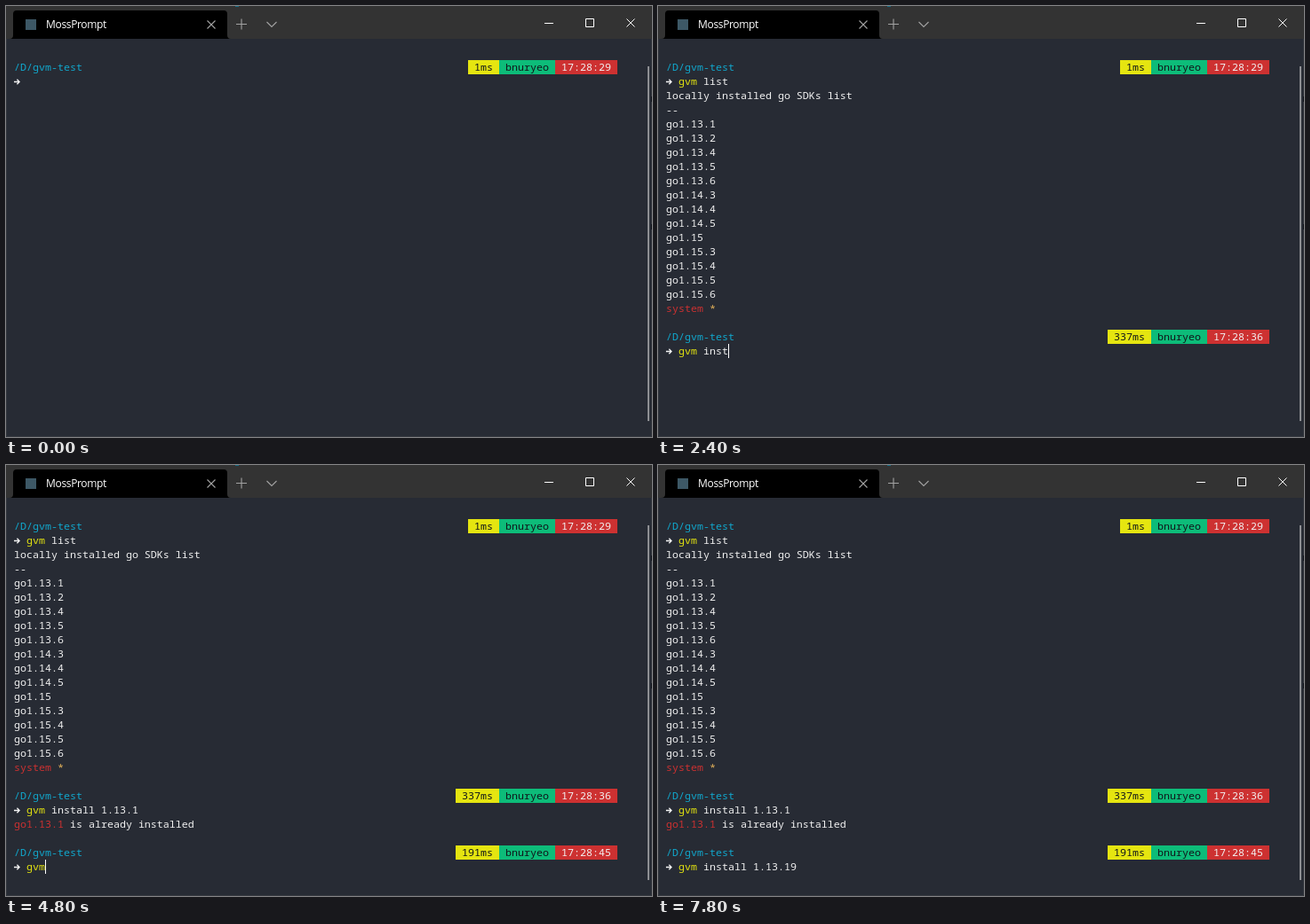
An HTML page that plays this animation: 727 by 486 pixels, repeating every 8 s.

```html
<!DOCTYPE html>
<html lang="en">
<head>
<meta charset="utf-8">
<title>Terminal</title>
<style>
  html, body { margin: 0; width: 100%; height: 100%; overflow: hidden; background: #272b34; }
  #stage { position: relative; width: 727px; height: 486px; overflow: hidden; background: #272b34; }
  #chrome { position: absolute; inset: 0; }
  #title {
    position: absolute; left: 45px; top: 13px; color: #fff;
    font: 12px/16px "Open Sans", "Noto Sans", sans-serif; letter-spacing: -.35px;
  }
  .row, .badges {
    position: absolute; height: 16px; white-space: pre; color: #f2f2f2;
    font: 500 11.667px/16px "Noto Sans Mono", "DejaVu Sans Mono", monospace;
    font-variant-ligatures: none;
  }
  .row { left: 9px; }
  .row svg { vertical-align: top; }
  .badges { right: 39px; display: flex; color: #10151a; }
  .badges .time { color: #f2f2f2; }
  .cyan { color: #11a8cd; }
  .yellow { color: #e5e510; }
  .red { color: #cd3131; }
  .star { color: #e8b45a; }
  .ms { background: #e5e510; }
  .user { background: #0dbc79; }
  .time { background: #cd3131; }
  #cursor { position: absolute; width: 1px; height: 16px; background: #fff; }
  [hidden] { display: none; }
</style>
</head>
<body>
<div id="stage">
  <svg id="chrome" width="727" height="486" fill="none">
    <path fill="#333" d="M0 0H727V37H0Z"/>
    <path fill="#000" d="M4 37Q8 37 8 33V9Q8 5 12 5H245Q249 5 249 9V33Q249 37 253 37Z"/>
    <path fill="#176c86" d="M258 0h4v1h-4z"/>
    <path fill="#3d5866" d="M22 15h12v12h-12z"/>
    <g stroke="#a2a2a2" stroke-width="1.1">
      <path d="M226.5 16.5l9 9m0-9l-9 9"/>
      <path d="M259 20.5h12M265 14.5v12"/>
      <path d="M293.5 18l5.5 5.5l5.5-5.5"/>
    </g>
    <g stroke="#fff">
      <path d="M606 19.5h10M652.5 14.5h9v9h-9z"/>
      <path d="M698.5 14.5l9 9m0-9l-9 9"/>
    </g>
    <path fill="#8d8f93" d="M722 68h2v400h-2z"/>
    <path stroke="#35383f" d="M.5 37V485.5H726.5V37"/>
    <path fill="#15181d" d="M726 102h1v6h-1zM726 246h1v6h-1z"/>
  </svg>
  <div id="title">MossPrompt</div>
  <div id="screen"></div>
  <div id="cursor"></div>
</div>
<script>
  const LOOP = 8000, TICK = 150, COL = 7, ROW = 16, LEFT = 9, TOP = 61;
  const span = (cls, text) => `<span class="${cls}">${text}</span>`;
  const versions = Object.entries({13: '12456', 14: '345', 15: '.3456'})
    .flatMap(([minor, patches]) => [...patches].map(p => `go1.${minor}` + (p === '.' ? '' : '.' + p)));

  // keys: characters typed at each tick; one past the end means Enter
  const blocks = [
    { row: 0, from: 0, ms: '1ms', time: '17:28:29', text: 'gvm list',
      keys: [0, 0, 1, 3, 5, 6, 8, 8, 9],
      out: ['locally installed go SDKs list', '--', ...versions, span('red', 'system') + span('star', ' *')] },
    { row: 19, from: 9, ms: '337ms', time: '17:28:36', text: 'gvm install 1.13.1',
      keys: [0, 0, 0, 0, 2, 4, 6, 8, 10, 11, 12, 13, 15, 16, 17, 17, 18, 19],
      out: [span('red', 'go1.13.1') + ' is already installed'] },
    { row: 23, from: 27, ms: '191ms', time: '17:28:45', text: 'gvm install 1.13.19',
      keys: [0, 0, 0, 1, 2, 3, 4, 5, 7, 8, 10, 12, 12, 13, 14, 14, 15, 15, 16, 17, 18, 18, 19, 19, 20, 20],
      out: [] }
  ];
  const cursorOff = new Set([0, 10, 12, 14, 28, 52, 53]);

  const arrow = '<svg width="7" height="16" fill="none" stroke="#f2f2f2" stroke-width="1.3">' +
    '<path d="M0 8.5H6M3.4 5.7L6.2 8.5L3.4 11.3"/></svg>';
  const screen = document.getElementById('screen');
  const cursor = document.getElementById('cursor');

  function add(parent, cls, row, html) {
    const el = document.createElement('div');
    el.className = cls;
    el.style.top = TOP + row * ROW + 'px';
    el.innerHTML = html;
    parent.append(el);
    return el;
  }

  for (const b of blocks) {
    b.el = document.createElement('div');
    b.outEl = document.createElement('div');
    add(b.el, 'row cyan', b.row, '/D/gvm-test');
    add(b.el, 'badges', b.row, span('ms', ` ${b.ms} `) + span('user', ' bnuryeo ') + span('time', ` ${b.time} `));
    const line = add(b.el, 'row', b.row + 1, arrow + ' <span class="yellow"></span><span></span>');
    [b.cmd, b.args] = line.querySelectorAll('span');
    b.out.forEach((html, i) => add(b.outEl, 'row', b.row + 2 + i, html));
    b.el.append(b.outEl);
    screen.append(b.el);
  }

  function draw(tick) {
    const current = blocks.findLastIndex(b => tick >= b.from);
    blocks.forEach((b, i) => {
      const n = b.keys[Math.max(0, Math.min(tick - b.from, b.keys.length - 1))];
      b.el.hidden = i > current;
      b.outEl.hidden = i >= current;
      b.cmd.textContent = b.text.slice(0, Math.min(n, 3));
      b.args.textContent = b.text.slice(3, Math.max(n, 3));
      if (i === current) {
        const entered = n > b.text.length;
        cursor.style.left = LEFT + (entered ? 0 : n + 2) * COL + 'px';
        cursor.style.top = TOP + (b.row + (entered ? 2 : 1)) * ROW + 'px';
      }
    });
    cursor.hidden = cursorOff.has(tick);
  }

  const start = performance.now();
  let shown = -1;
  function frame() {
    const tick = Math.floor((performance.now() - start) % LOOP / TICK);
    if (tick !== shown) draw(shown = tick);
    requestAnimationFrame(frame);
  }
  frame();
</script>
</body>
</html>
```
